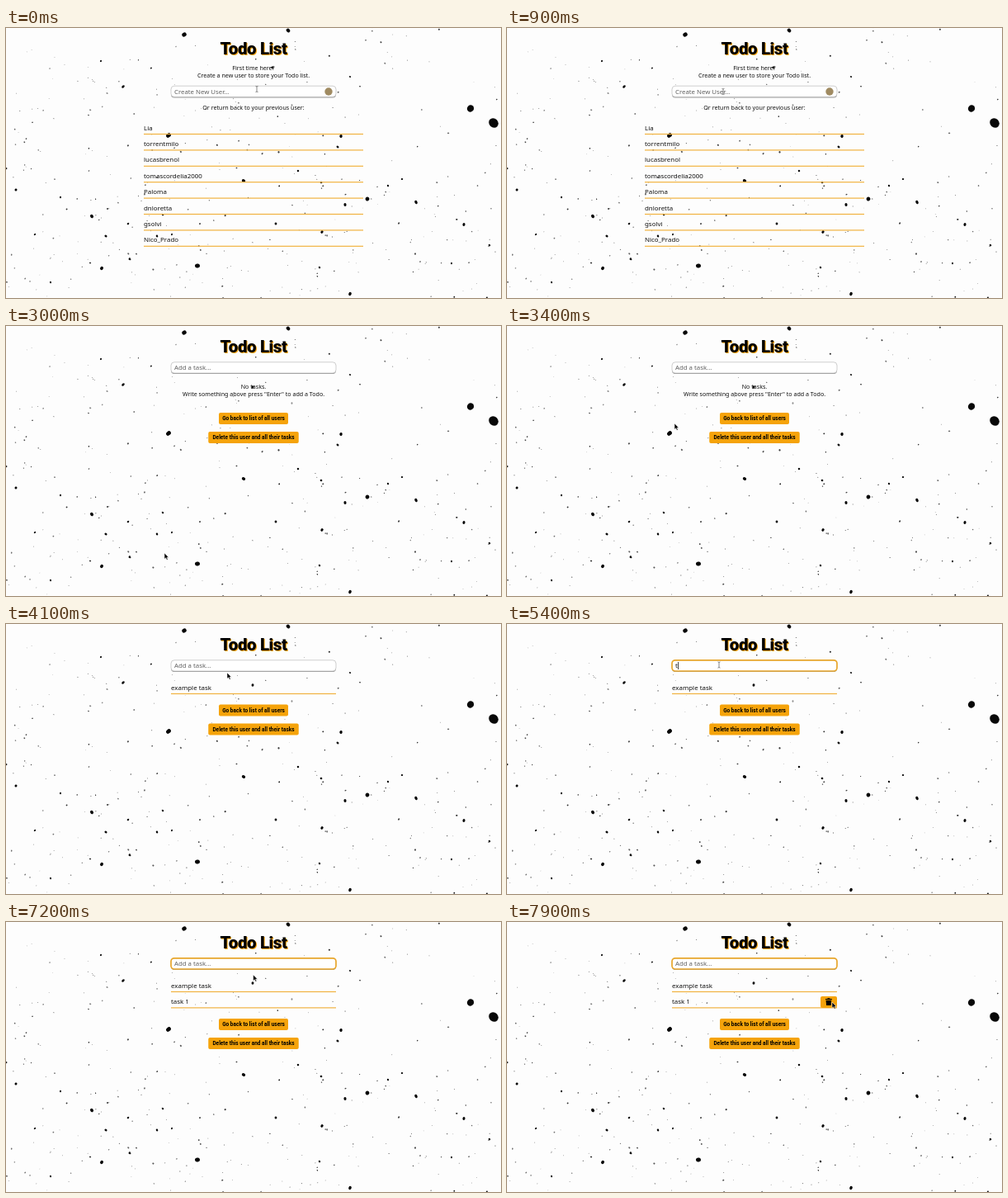
Animation, 600 px wide and 327 px high, one loop 8 s. Source, as an HTML page:

```html
<!DOCTYPE html>
<html lang="en">
<head>
<meta charset="utf-8">
<title>Todo List</title>
<style>
  html, body { margin: 0; width: 100%; height: 100%; overflow: hidden; background: #fdfdfd; }
  svg { display: block; width: 600px; height: 327px; }
  text { font-family: "Noto Sans", "Open Sans", sans-serif; fill: #111; white-space: pre; }
  .mid { text-anchor: middle; }
  .note { font-size: 7.1px; }
  .item { font-size: 7.9px; }
  .title { font: 900 20.5px Roboto, sans-serif; letter-spacing: -.4px; }
  .label { font: 700 6.5px Roboto, sans-serif; fill: #000; }
</style>
</head>
<body>
<svg id="stage" viewBox="0 0 600 327"></svg>
<script>
const LOOP = 8000, PITCH = 19.4, ORANGE = '#f5a30a', LINE = '#f1b340';
const stage = document.getElementById('stage');

function add(parent, tag, attrs = {}, text) {
  const el = document.createElementNS('http://www.w3.org/2000/svg', tag);
  for (const key in attrs) el.setAttribute(key, attrs[key]);
  if (text !== undefined) el.textContent = text;
  parent.append(el);
  return el;
}
const show = (el, on) => el.setAttribute('visibility', on ? 'inherit' : 'hidden');
const moveTo = (el, x, y) => el.setAttribute('transform', `translate(${x} ${y})`);

// Ink splatter
let seed = 41;
const rnd = () => (seed = (seed * 16807) % 2147483647) / 2147483647;

function blot(parent, x, y, r, opacity = 1) {
  add(parent, 'ellipse', {
    rx: r * (.95 + .2 * rnd()), ry: r * (.75 + .25 * rnd()), opacity,
    transform: `translate(${x} ${y}) rotate(${rnd() * 180})`
  });
}

const blots = [
  [216, 8, 2.6], [342, 3, 2.6], [142, 71, 1.8], [563, 97.5, 4.5], [591, 115, 5.4],
  [197, 130, 2.8], [406, 131, 1.8], [288, 185, 2], [438, 207, 2.5], [411, 214, 2],
  [497, 211, 2.1], [104, 228, 2], [232, 288, 2.8], [116, 291, 2.3], [417, 322, 2.2],
  [383, 247, 1.9], [327, 237, 1.5], [121, 252, 1.6], [148, 237, 1.3], [12, 196, 1.5],
  [190, 226, 1.3], [354, 173, 1.3], [402, 144, 1.5], [555, 238, 1.9], [586, 263, 1.2],
  [54, 308, 1.2], [115, 40, 1.2], [323, 48, 1.6], [299, 74, 1.6], [183, 252, 1.4],
  [382, 187, 1.4], [417, 59, 1], [463, 191, 1.3], [480, 183, 1.1], [380, 290, 1.2],
  [540, 285, 1.2], [150, 280, 1.4], [201, 250, 1.2], [66, 205, 1.2], [35, 250, 1.2]
];

const ink = add(stage, 'g', { fill: '#080808' });
for (let i = 0; i < 340; i++) {
  const x = rnd() * 600, y = 327 * rnd() ** .7;
  blot(ink, x.toFixed(1), y.toFixed(1), .35 + .75 * rnd() ** 2, .45 + .55 * rnd());
}
blots.forEach(b => blot(ink, ...b));

// Page parts
function makeRow(parent, x, width, y, text) {
  const row = add(parent, 'g');
  add(row, 'text', { x, y: y - 5, class: 'item' }, text);
  add(row, 'rect', { x, y: y - .6, width, height: 1.2, fill: LINE });
  return row;
}

function makeField(parent, y, hint) {
  const box = { x: 200, width: 200, height: 13.2, rx: 4 };
  add(parent, 'rect', { ...box, y: y + 1, fill: '#999' });
  const frame = add(parent, 'rect', { ...box, y, fill: '#fff' });
  const ghost = add(parent, 'text', { x: 204, y: y + 9.5, 'font-size': 7.8, style: 'fill:#606060' }, hint);
  const typed = add(parent, 'text', { x: 204, y: y + 9.5, class: 'item' });
  const caret = add(parent, 'rect', { y: y + 2.2, width: .8, height: 9, fill: '#111' });
  return (text, focus, blink) => {
    frame.setAttribute('stroke', focus ? '#e8a62c' : '#bbb');
    frame.setAttribute('stroke-width', focus ? 1.7 : .7);
    typed.textContent = text;
    show(ghost, !text);
    show(caret, focus && blink);
    if (text) caret.setAttribute('x', 204.4 + typed.getComputedTextLength());
    else caret.setAttribute('x', 203.7);
  };
}

function makeButton(parent, y, width, text) {
  add(parent, 'rect', { x: 300 - width / 2, y, width, height: 14, rx: 2, fill: ORANGE });
  add(parent, 'text', { x: 300, y: y + 9.3, class: 'label mid' }, text);
}

const note = (parent, y, text) => add(parent, 'text', { x: 300, y, class: 'note mid' }, text);

add(stage, 'text', { x: 301, y: 33, class: 'title mid', style: 'fill:' + ORANGE }, 'Todo List');
add(stage, 'text', { x: 300, y: 32, class: 'title mid', style: 'fill:#000' }, 'Todo List');

// User page
const userPage = add(stage, 'g');
note(userPage, 50.5, 'First time here?');
note(userPage, 60, 'Create a new user to store your Todo list.');
note(userPage, 99, 'Or return back to your previous user:');
const userField = makeField(userPage, 70.2, 'Create New User...');
add(userPage, 'circle', { cx: 391, cy: 77, r: 4.7, fill: '#a08b62' });
const users = ['Lia', 'torrentmilo', 'lucasbrenol', 'tomascordelia2000', 'Paloma',
  'dnloretta', 'gsolvi', 'Nico_Prado', 'Test'];
const userRows = users.map((name, i) => makeRow(userPage, 167, 266, 128.5 + i * PITCH, name));

// Task page
const taskPage = add(stage, 'g');
const taskField = makeField(taskPage, 43.8, 'Add a task...');
const empty = add(taskPage, 'g');
note(empty, 76.3, 'No tasks.');
note(empty, 85.3, 'Write something above press "Enter" to add a Todo.');
const taskRows = ['example task', 'task 1'].map((name, i) =>
  makeRow(taskPage, 200, 200, 84.5 + i * PITCH, name));
const buttons = add(taskPage, 'g');
makeButton(buttons, 0, 84, 'Go back to list of all users');
makeButton(buttons, 23, 109.5, 'Delete this user and all their tasks');

const bin = add(taskPage, 'g');
add(bin, 'rect', { x: 380, y: 70.5, width: 20, height: 14, rx: 2, fill: ORANGE });
add(bin, 'path', { d: 'M386 73.7h2.2l.6-.8h2.2l.6.8h2.2v1.2h-7.8zM386.6 75.5h6.6l-.5 6.2h-5.6z' });

// Pointer
const arrow = add(stage, 'path', {
  d: 'M0 0V7.2L1.7 5.7L2.9 8.3L4.2 7.7L3 5.2H5.2Z', fill: '#000', stroke: '#fff', 'stroke-width': .5
});
const beam = add(stage, 'path', {
  d: 'M-1.5 -3.6Q0 -3.6 0 -2.6Q0 -3.6 1.5 -3.6M0 -2.6V2.6M-1.5 3.6Q0 3.6 0 2.6Q0 3.6 1.5 3.6',
  fill: 'none', stroke: '#555', 'stroke-width': .7
});

// time, x, y
const route = [
  [0, 304, 74], [900, 262, 77], [1500, 231, 79], [2300, 231, 79], [2800, 192, 275],
  [3000, 192, 275], [3400, 203, 118], [3600, 203, 118], [4100, 268, 59], [4500, 257, 49.5],
  [6900, 257, 49.5], [7700, 391, 95], [7900, 394, 97], [8000, 394, 97]
];

function pointerAt(t) {
  const i = route.findIndex(p => p[0] > t);
  const [t0, x0, y0] = route[i - 1], [t1, x1, y1] = route[i];
  const k = (t - t0) / (t1 - t0), e = k * k * (3 - 2 * k);
  return [x0 + (x1 - x0) * e, y0 + (y1 - y0) * e];
}

// Last value whose start time has passed
const stepAt = (steps, t) => steps.reduce((now, [at, value]) => t >= at ? value : now, '');
const userKeys = [[1700, 'T'], [1800, 'Te'], [2000, 'Tes'], [2100, 'Test'], [2300, '']];
const taskKeys = [[5400, 't'], [5500, 'ta'], [5600, 'tas'], [5700, 'task'],
  [6000, 'task '], [6100, 'task 1'], [6300, '']];

function render(t) {
  const onUsers = t < 3000;
  show(userPage, onUsers);
  show(taskPage, !onUsers);

  const count = t < 3600 ? 0 : t < 6300 ? 1 : 2;
  const [x, y] = pointerAt(t);
  if (onUsers) {
    userField(stepAt(userKeys, t), t >= 1600, true);
    show(userRows[8], t >= 2300);
  } else {
    const start = t < 5400 ? 4500 : t < 6300 ? t : 6300;
    taskField(stepAt(taskKeys, t), t >= 4500, (t - start) % 1000 < 500);
    show(empty, count === 0);
    taskRows.forEach((row, i) => show(row, i < count));
    moveTo(buttons, 0, [105, 97.6, 117][count]);

    const hover = Math.floor((y - 67) / PITCH);
    show(bin, hover >= 0 && hover < count && x > 200 && x < 400);
    moveTo(bin, 0, hover * PITCH);
  }

  const top = onUsers ? 70 : 43.5;
  const inField = x > 200 && x < 400 && y > top && y < top + 14;
  show(beam, inField);
  show(arrow, !inField);
  moveTo(inField ? beam : arrow, x, y);
}

const began = performance.now();
function tick() {
  render((performance.now() - began) % LOOP);
  requestAnimationFrame(tick);
}
tick();
</script>
</body>
</html>
```
